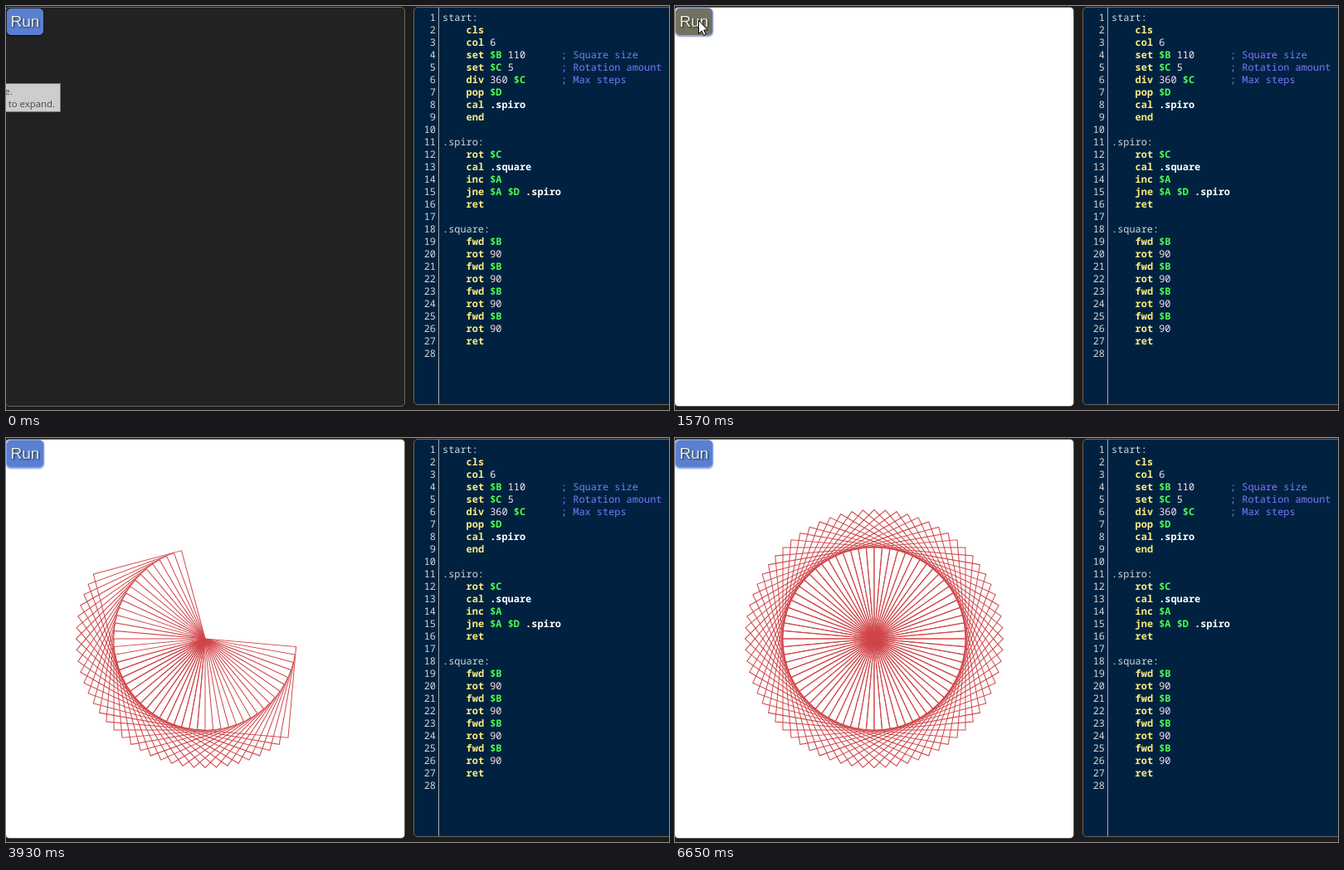
Write an HTML page with a canvas that moves like this. It is 799x487 px and loops after 8.43 s.

```html
<!DOCTYPE html>
<html lang="en">
<head>
<meta charset="utf-8">
<title>Spiro</title>
<style>
  :root { --loop: 8430ms; --edge: #70675b; }
  html, body { margin: 0; width: 100%; height: 100%; overflow: hidden; background: #1c1c1c; }
  body { position: relative; }
  .panel, .tip, .run, .cursor, canvas, .code span { position: absolute; box-sizing: border-box; }
  .panel { border: 1px solid var(--edge); border-radius: 5px; }
  .stage { left: -1px; top: 1px; width: 482px; height: 482px; background: #222; }
  canvas { left: 0; top: 2px; border-radius: 4px; }

  .editor { left: 491px; top: 1px; width: 330px; height: 480px; background: #002240; }
  .gutter { position: absolute; left: 521px; top: 2px; width: 1px; height: 478px; background: #aaa; }
  .code {
    position: absolute; left: 526px; top: 7px;
    font: 500 11.92px/15px "Noto Sans Mono", "DejaVu Sans Mono", monospace;
    text-rendering: geometricPrecision; white-space: pre;
  }
  .num { right: 8px; color: #d8d8d8; }
  .label { color: #d0dadc; }
  .op { color: #ffee80; font-weight: 600; }
  .var { color: #4dff4d; font-weight: 600; }
  .ref { color: #fff; font-weight: 600; }
  .val { color: #ffe4f0; }
  .note { color: #7878ff; }

  .tip {
    left: -100px; top: 93px; width: 166px; height: 35px; padding: 1px 6px 0 0;
    border: 1px solid #767676; background: #cdcdcd; color: #484848;
    font: 11.4px/15px "Open Sans", "Noto Sans", sans-serif; text-align: right;
    animation: tip var(--loop) linear infinite;
  }
  .tip div:first-child { padding-right: 51px; }
  .run {
    left: 1px; top: 3px; width: 44px; height: 32px; border-radius: 5px;
    font: 19px/31px "Liberation Sans", Arial, sans-serif; text-align: center;
    color: #e6f0e2; text-shadow: 1px 1px 2px #000b;
    animation: face var(--loop) linear infinite, ring var(--loop) step-end infinite;
  }
  .cursor { left: 0; top: 0; overflow: visible; animation: move var(--loop) linear infinite; }

  @keyframes tip {
    0%, .71% { opacity: 1; }
    4.74%, 99.99% { opacity: 0; }
  }
  @keyframes face {
    0%, 5.34% { background: #5a7fd2; }
    8.66%, 16.73% { background: #6bbcc6; }
    18.2%, 19% { background: #747160; }
    23%, 28% { background: #6bbcc6; }
    32%, 100% { background: #5a7fd2; }
  }
  @keyframes ring {
    0% { box-shadow: 0 1px 2px #000a; }
    16.73%, 100% { box-shadow: 0 0 0 1px #86a6e6, 0 1px 2px 1px #7c98d0; }
  }
  @keyframes move {
    0%, 2.4% { transform: translate(-14px, 72px); }
    8.66%, 10.55% { transform: translate(33px, 17px); }
    10.56%, 11.26% { transform: translate(30px, 17px); }
    11.27%, 26.45% { transform: translate(28px, 17px); }
    29.66%, 100% { transform: translate(-14px, 60px); }
  }
</style>
</head>
<body>
<div class="panel stage"></div>
<canvas width="480" height="480"></canvas>
<div class="tip"><div>e.</div><div>t to expand.</div></div>
<div class="run">Run</div>
<div class="panel editor"></div>
<div class="gutter"></div>
<div class="code"></div>
<svg class="cursor" width="12" height="19">
  <path d="M.5 .5V16.5L4.2 13L6.7 18.5L9.2 17.4L6.8 12H11.5Z" fill="#fff" stroke="#000"/>
</svg>

<script>
const LOOP = 8430, CLEAR = 1570, SIZE = 110, TURN = 5, CENTER = 240, COL = 7.15, ROW = 15;

const side = "    fwd $B\n    rot 90\n";
const program = `start:
    cls
    col 6
    set $B 110      ; Square size
    set $C 5        ; Rotation amount
    div 360 $C      ; Max steps
    pop $D
    cal .spiro
    end

.spiro:
    rot $C
    cal .square
    inc $A
    jne $A $D .spiro
    ret

.square:
${side.repeat(4)}    ret
`;

const token = /(?<note>;.*)|(?<label>\S+:)|(?<var>\$\w)|(?<ref>\.\w+)|(?<val>\d+)|(?<op>[a-z]+)/g;
const code = document.querySelector(".code");

function addText(kind, text, row, col) {
  const span = document.createElement("span");
  span.className = kind;
  span.textContent = text;
  span.style.top = row * ROW + "px";
  if (col !== undefined) span.style.left = col * COL + "px";
  code.append(span);
}

program.split("\n").forEach((line, row) => {
  addText("num", row + 1, row);
  for (const m of line.matchAll(token)) {
    const kind = Object.keys(m.groups).find(k => m.groups[k]);
    addText(kind, m[0], row, m.index);
  }
});

// Drawing pace: [time in ms, squares finished]
const pace = [[1650, 1], [2230, 9], [2310, 10], [3050, 20], [3110, 21], [3190, 22], [3930, 33],
  [4010, 34], [4070, 35], [4890, 47], [4950, 48], [5770, 60], [5850, 61], [6650, 72]];

function squaresAt(t) {
  if (t < pace[0][0]) return 0;
  const i = pace.findIndex(p => p[0] > t);
  if (i < 0) return 72;
  const [t0, n0] = pace[i - 1], [t1, n1] = pace[i];
  return Math.floor(n0 + (n1 - n0) * (t - t0) / (t1 - t0) + 1e-6);
}

const ctx = document.querySelector("canvas").getContext("2d");
ctx.strokeStyle = "#d04448";

function draw(t) {
  ctx.clearRect(0, 0, 480, 480);
  if (t < CLEAR) return;
  ctx.fillStyle = "#fff";
  ctx.fillRect(0, 0, 480, 480);
  const count = squaresAt(t);
  for (let k = 1; k <= count; k++) {
    ctx.save();
    ctx.translate(CENTER, CENTER);
    ctx.rotate(k * TURN * Math.PI / 180);
    ctx.strokeRect(0, 0, SIZE, SIZE);
    ctx.restore();
  }
}

let start;
function tick(now) {
  start ??= now;
  draw((now - start) % LOOP);
  requestAnimationFrame(tick);
}
requestAnimationFrame(tick);
</script>
</body>
</html>
```
